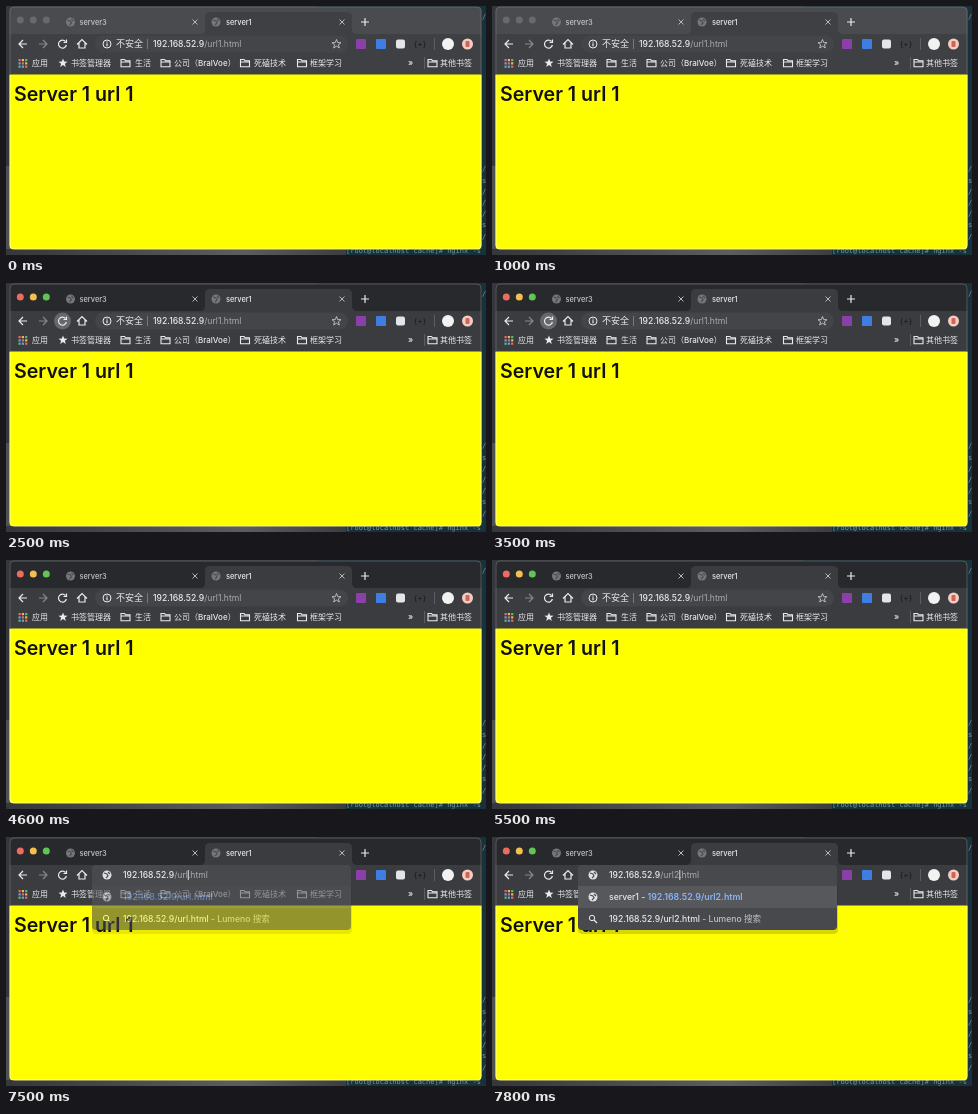
An HTML page that plays this animation: 480 by 249 pixels, repeating every 8000 ms.

```html
<!DOCTYPE html>
<html lang="zh">
<head>
<meta charset="utf-8">
<style>
html, body { margin: 0; width: 100%; height: 100%; overflow: hidden; background: #222; }
svg { display: block; width: 100vw; height: 100vh; }
text { font: 500 8.6px Inter, "Noto Sans CJK SC", "Noto Sans CJK", sans-serif; fill: #e8eaed; white-space: pre; }
.tab { font-size: 7.4px; }
.mark { font-size: 8px; }
.mono { font: 7px "DejaVu Sans Mono", monospace; fill: #7f979c; }
.path { fill: #a9adb2; font-weight: 400; }
.line { fill: none; stroke: #e8eaed; stroke-width: 1.2; }
.dim { stroke: #85888c; }
.thin { stroke: #6b6e72; stroke-width: .7; }
.strip { fill: #4a4b4e; }
.bar { fill: #3f4043; }
.light { fill: #68696b; }
.active .strip { fill: #27292c; }
.active .bar { fill: #3b3c40; }
.active .light { fill: var(--c); }
</style>
</head>
<body>
<svg id="stage" viewBox="0 0 480 249" preserveAspectRatio="none">
  <defs>
    <g id="globe"><circle r="4.5" fill="currentColor"/><path d="M-3 -2L0 -1L1 1L-1 3M1 -3L3 -1" fill="none" stroke="#4b4d50" stroke-width="1.2"/></g>
    <path id="cross" class="line" d="M-2.5 -2.5L2.5 2.5M2.5 -2.5L-2.5 2.5" style="stroke:#b5b7ba;stroke-width:1"/>
    <path id="folder" class="line" d="M-4.5 -3.5h3.5l1 1.2h4.5v6h-9zM-4.5 -1h9" style="stroke-width:1.1"/>
    <path id="star" d="M0 -4.5L1.2 -1.4L4.5 -1.3L1.9 .7L2.8 4L0 2.1L-2.8 4L-1.9 .7L-4.5 -1.3L-1.2 -1.4Z"/>
    <clipPath id="win"><rect x="3.5" y="1" width="472" height="242.5" rx="4"/></clipPath>
    <linearGradient id="desk"><stop stop-color="#35373a"/><stop offset=".7" stop-color="#5c5d5e"/><stop offset="1" stop-color="#3c3d3f"/></linearGradient>
  </defs>

  <rect width="480" height="249" fill="#34373b"/>
  <rect y="160" width="5" height="89" fill="#4f5153"/>
  <rect y="243" width="340" height="6" fill="url(#desk)"/>
  <path d="M312 0h168v249h-140v-6h-28z" fill="#17323b"/>
  <g id="shell"></g>

  <g clip-path="url(#win)">
    <rect class="strip" x="3" y="1" width="473" height="28"/>
    <rect class="bar" x="3" y="28" width="473" height="41"/>
    <path class="bar" d="M194 28q5 0 5 -5v-12q0 -5 5 -5h137q5 0 5 5v12q0 5 5 5z"/>
    <rect x="3" y="68.500" width="473" height="175" fill="#ff0"/>
    <text x="8" y="94.700" style="font-size:19.600px;font-weight:600;fill:#111">Server 1 url 1</text>
  </g>
  <path d="M4 69v170q0 4 4 4h463q4 0 4 -4v-170" fill="none" stroke="#fff" stroke-opacity=".6" stroke-width=".9"/>
  <path d="M4 69v-64q0 -4 4 -4h463q4 0 4 4v64" fill="none" stroke="#777" stroke-width=".6"/>

  <circle class="light" cx="14.300" cy="14" r="3.500" style="--c:#ed6b5f"/>
  <circle class="light" cx="27.300" cy="14" r="3.500" style="--c:#f4be50"/>
  <circle class="light" cx="40.300" cy="14" r="3.500" style="--c:#61c455"/>
  <g color="#74777b"><use href="#globe" x="64.500" y="16"/><use href="#globe" x="210" y="16"/></g>
  <text class="tab" x="73.500" y="18.800" style="fill:#c4c6c9">server3</text><use href="#cross" x="189" y="16"/>
  <text class="tab" x="220" y="18.800">server1</text><use href="#cross" x="336" y="16"/>
  <path class="line" d="M355 16h8M359 12v8"/>

  <circle id="hover" cx="56.500" cy="38" r="8.500" fill="#66686c"/>
  <path class="line" d="M21 38h-8M17 34l-4 4l4 4"/>
  <path class="line dim" d="M33 38h8M37 34l4 4l-4 4"/>
  <path class="line" d="M59.500 35.500a4 4 0 1 0 .9 3.500M60.500 33.500v3h-3"/>
  <path class="line" d="M71 38.500l5 -5l5 5M73 37v5h6v-5"/>

  <rect id="box" x="89" y="29.500" width="253" height="17" rx="8.500"/>
  <g id="address">
    <circle class="line" cx="101" cy="38" r="4" style="stroke-width:1"/>
    <path class="line" d="M101 37.300v3M101 35.500v1"/>
    <text x="110" y="41.200" style="font-size:9px">不安全</text>
    <path class="line dim" d="M141.500 33v10" style="stroke-width:.8"/>
    <text x="147" y="41.200">192.168.52.9<tspan class="path">/url1.html</tspan></text>
    <use href="#star" x="330.500" y="38" fill="none" stroke="#c4c6c9" stroke-width=".9"/>
  </g>
  <g id="edit">
    <path class="line" d="M307 40v-5h8M306 41h5M312.500 37h3v4h-3z" style="stroke:#c4c6c9;stroke-width:.9"/>
    <path class="line" d="M217 33v10" style="stroke-width:.9"/>
  </g>

  <rect x="350" y="33" width="10" height="10" rx="1" fill="#8b3fa8"/>
  <rect x="370" y="33" width="10" height="10" rx="1" fill="#3f7de0"/>
  <rect x="390" y="33.500" width="9" height="9" rx="2" fill="#e4e5e6"/>
  <text class="mark" x="414" y="41" text-anchor="middle" style="fill:#1d1e20">{+}</text>
  <path class="line thin" d="M428.500 32v12"/>
  <circle cx="442" cy="38" r="6" fill="#f2f2f2"/>
  <circle cx="461.500" cy="38" r="5.500" fill="#f3cdc2"/>
  <rect x="459.500" y="35" width="4" height="6" rx="1" fill="#cf6558"/>

  <g id="apps"></g>
  <g id="marks"></g>
  <use href="#star" x="57" y="57" fill="#e8eaed"/>
  <text x="402" y="60">»</text>
  <path class="line thin" d="M418.500 51v12"/>

  <g id="popup" color="#dfe1e4">
    <g id="sheet">
      <path d="M86 48h260v45q0 4 -5 4h-250q-5 0 -5 -4z" fill="#222" opacity=".18"/>
      <path d="M86 48h259v41q0 4 -4 4h-251q-4 0 -4 -4z" fill="#47494d"/>
      <rect x="86" y="49" width="259" height="22" fill="#56585c"/>
      <use href="#globe" x="101" y="60"/>
      <text x="117" y="63.200"><tspan id="title">server1 - </tspan><tspan id="match" style="fill:#8ab4f8;font-weight:600;font-size:8.800px"></tspan></text>
      <circle class="line" cx="100" cy="81" r="2.700" style="stroke-width:1"/>
      <path class="line" d="M102 83l3 3"/>
      <text x="117" y="85.200"><tspan id="query"></tspan><tspan style="fill:#bdc1c6"> - Lumeno 搜索</tspan></text>
    </g>
    <path d="M86 49v-17q0 -4 4 -4h251q4 0 4 4v17z" fill="#47494d"/>
    <use href="#globe" x="101" y="38"/>
    <text x="117" y="41.200">192.168.52.9<tspan id="typed" class="path"></tspan></text>
    <path id="caret" class="line" d="M0 33v10" style="stroke-width:.9"/>
  </g>
</svg>
<script>
const $ = id => document.getElementById(id);
const show = (id, on) => $(id).style.display = on ? '' : 'none';

// Terminal text showing around the window
let shell = '<text class="mono" x="340" y="247">[root@localhost cache]# nginx -s</text>';
[[13, '/'], [165, '/'], [177, 's'], [188, '/'], [199, '/'], [210, '/'], [221, 's'], [233, '/']]
  .forEach(([y, s]) => shell += `<text class="mono" x="476" y="${y}">${s}</text>`);
$('shell').innerHTML = shell;

const hues = ['#ea6a5e', '#f2b84b', '#5fb878', '#6a9df0'];
let apps = '';
for (let i = 0; i < 9; i++)
  apps += `<rect x="${12.5 + i % 3 * 3.3}" y="${53 + (i / 3 | 0) * 3.3}" width="2.2" height="2.2" fill="${hues[i % 4]}"/>`;
$('apps').innerHTML = apps;

// Label, text x, folder x (if any)
$('marks').innerHTML = [
  ['应用', 26], ['书签管理器', 65], ['生活', 129, 119.5], ['公司（BralVoe）', 168, 159.5],
  ['死磕技术', 248, 239], ['框架学习', 304, 296], ['其他书签', 434, 426.5]
].map(([s, x, f]) => `<text class="mark" x="${x}" y="60">${s}</text>` +
  (f ? `<use href="#folder" x="${f}" y="57"/>` : '')).join('');

function draw(t) {
  const focused = t >= 6100, open = t >= 7500, done = t >= 7800;
  $('stage').classList.toggle('active', t >= 1400);
  show('hover', t >= 1500 && t < 3800);
  $('box').setAttribute('fill', focused ? '#4e5054' : '#434549');
  $('box').setAttribute('stroke', focused ? '#5f86b8' : 'none');
  show('edit', focused && !open);
  show('address', !open);
  show('popup', open);
  if (!open) return;
  const path = done ? '/url2.html' : '/url.html';
  $('sheet').setAttribute('opacity', t < 7600 ? .58 : 1);
  show('title', done);
  $('typed').textContent = path;
  $('match').textContent = $('query').textContent = '192.168.52.9' + path;
  $('caret').setAttribute('transform', `translate(${done ? 187.8 : 182.3})`);
}

function tick() {
  draw(performance.now() % 8000);
  requestAnimationFrame(tick);
}
tick();
</script>
</body>
</html>
```
